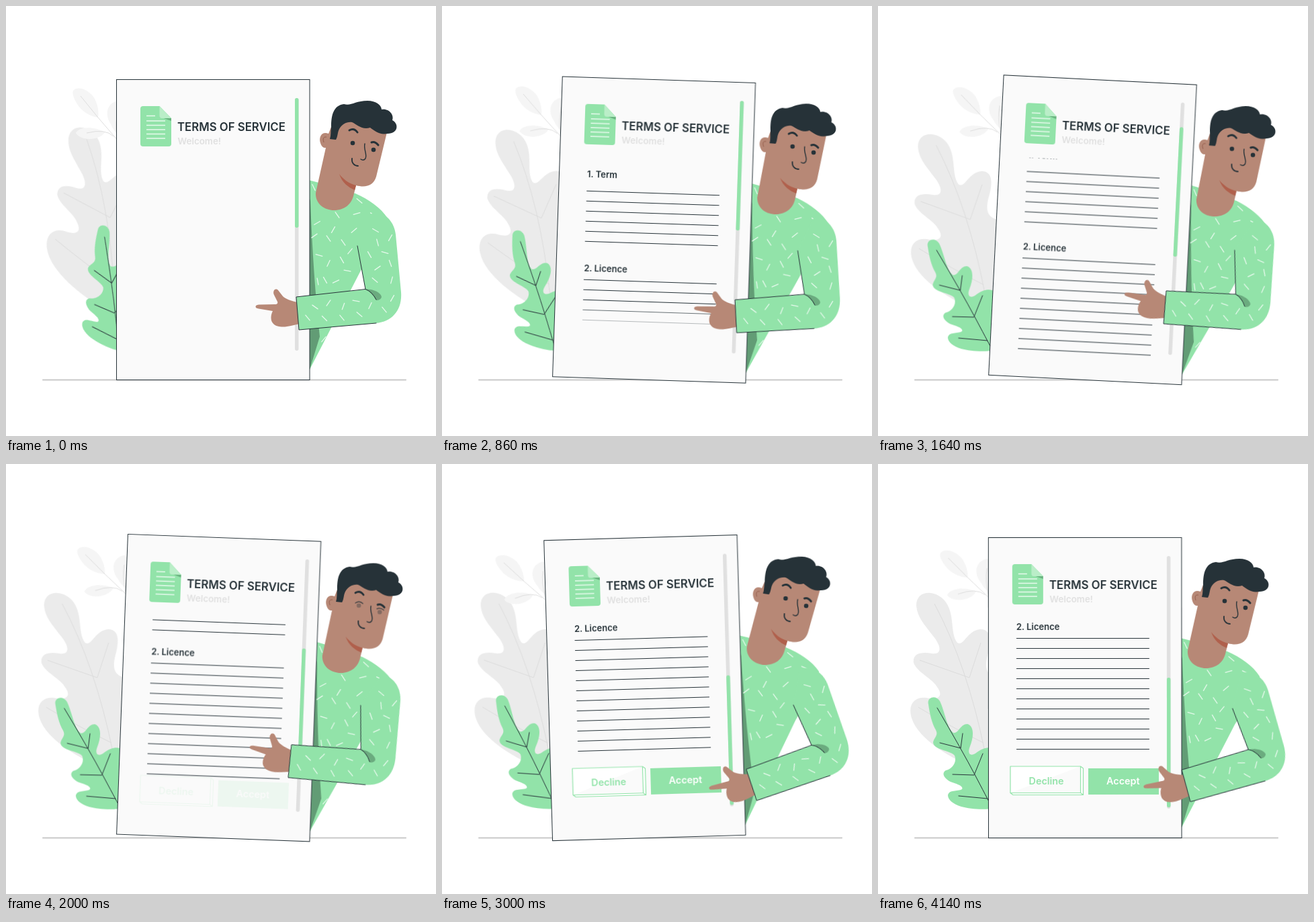
These frames come from a looping animation (640 px wide and 640 px high, 4210 ms). An HTML page:

```html
<!DOCTYPE html>
<html lang="en">
<head>
<meta charset="utf-8">
<title>Terms of service</title>
<style>
html, body { margin: 0; width: 100%; height: 100%; overflow: hidden; background: #fff; }
svg { display: block; width: 100%; height: 100%; }
text { font-family: Inter, "Open Sans", sans-serif; font-weight: 600; }
.line { fill: none; stroke: #263238; stroke-linecap: round; stroke-linejoin: round; }
.green { fill: #92e3a9; }
.dark { fill: #263238; }
.skin { fill: #b78876; }
.dash { fill: none; stroke: #e6f9ec; stroke-width: 1.3; stroke-linecap: round; }

.sway, .head, .arm, .bush, .twig, .leaf, .scroll, .buttons {
  animation: 4210ms ease-in-out infinite;
}
.sway { transform-origin: 308.5px 556.5px; animation-name: sway; }
.head { transform-origin: 488px 290px; animation-name: head; }
.arm  { transform-origin: 563px 335px; animation-name: arm; }
.bush { transform-origin: 166px 443px; animation-name: bush; }
.twig { transform-origin: 165px 200px; animation-name: twig; }
.leaf { transform-origin: 168px 508px; animation-name: leaf; }
.first  { --by: -151px; animation-name: scrollLate; }
.second { --by: -151px; animation-name: scroll; }
.thumb  { --by: 181px; animation-name: scroll; }
.buttons { animation-name: buttons; }
.eyes { animation: eyes 4210ms linear infinite; }
.lids { animation: lids 4210ms linear infinite; }

@keyframes sway {
  0%, 100% { transform: rotate(0deg); }
  35.2% { transform: rotate(2.95deg); }
  79.6% { transform: rotate(-2deg); }
}
@keyframes head {
  0%, 100% { transform: rotate(0deg); }
  30.9% { transform: rotate(-5deg); }
  78.4% { transform: rotate(4.2deg); }
}
@keyframes arm {
  0% { transform: rotate(0deg); }
  16.6% { transform: rotate(-.3deg); }
  50%, 56.3% { transform: rotate(8.2deg); }
  72.4%, 84.8% { transform: rotate(-12.4deg); }
  100% { transform: rotate(-10.5deg); }
}
@keyframes bush {
  0% { transform: rotate(8.6deg); }
  48.7%, 61% { transform: rotate(-.1deg); }
  82% { transform: rotate(.4deg); }
  100% { transform: rotate(0deg); }
}
@keyframes twig {
  0% { transform: rotate(0deg); }
  44%, 61% { transform: rotate(-8deg); }
  84% { transform: rotate(-4.8deg); }
  100% { transform: rotate(-5.8deg); }
}
@keyframes leaf {
  0% { transform: rotate(21.5deg); }
  41.6%, 48% { transform: rotate(-.5deg); }
  80% { transform: rotate(2.6deg); }
  100% { transform: rotate(0deg); }
}
@keyframes scroll {
  0%, 30.9% { transform: none; }
  56.8%, 100% { transform: translateY(var(--by)); }
}
@keyframes scrollLate {
  0%, 30.9% { transform: none; }
  58.2%, 100% { transform: translateY(var(--by)); }
}
@keyframes buttons {
  0%, 44.4% { opacity: 0; transform: translateY(20px); }
  57%, 100% { opacity: 1; transform: none; }
}
@keyframes eyes {
  0%, 8%, 16%, 43%, 52%, 58%, 64%, 81%, 89%, 100% { opacity: 1; }
  12%, 47.5%, 84.8% { opacity: .35; }
  61% { opacity: .7; }
}
@keyframes lids {
  0%, 8%, 16%, 43%, 52%, 58%, 64%, 81%, 89%, 100% { opacity: 0; }
  12%, 47.5%, 84.8% { opacity: .8; }
  61% { opacity: .2; }
}
</style>
</head>
<body>
<svg viewBox="0 0 640 640">
  <clipPath id="window"><rect x="180" y="230" width="245" height="290"/></clipPath>

  <path d="M55 556.5H595" fill="none" stroke="#c9c9c9" stroke-width="2" stroke-linecap="round"/>

  <g class="bush">
    <path fill="#ebebeb" d="M57 210C57 189 82 186 98 202C116 222 106 250 118 266C128 272 132 248 152 246C172 246 167 270 163 285C158 305 162 315 178 318L192 440L152 455C110 440 60 410 50 378C44 358 54 346 72 348C90 352 98 345 88 332C82 320 58 310 53 296C51 282 64 279 80 282C95 284 95 272 82 256C70 240 58 228 57 210Z"/>
    <path fill="none" stroke="#dcdcdc" d="M84 208Q133 300 159 428M62 292L136 318L153 266M60 362Q110 392 157 415"/>
  </g>

  <g class="sway"><g class="twig">
    <path fill="#f5f5f5" d="M100 126C106 118 124 124 132 138C138 150 138 160 137 166C124 164 112 156 106 146C101 138 98 130 100 126ZM168 141C150 143 146 162 156 176C158 182 162 186 165 190C180 170 182 145 168 141ZM104 189C108 180 130 178 147 188C140 200 112 202 104 189Z"/>
    <path fill="none" stroke="#dedede" d="M111 134L137 166L168 202M120 189Q148 182 160 194M167 155Q162 172 165 196"/>
  </g></g>

  <g class="leaf">
    <path class="green" d="M75 358C72 347 86 343 92 353C100 370 102 392 112 400C120 402 122 387 133 387C144 390 142 408 137 420C132 432 138 436 146 430C156 422 168 420 174 425L176 512C160 515 138 514 124 510C112 506 104 500 104 493C106 484 118 488 125 484C128 479 116 476 108 473C98 468 94 460 101 456C110 454 118 444 114 434C108 426 82 426 82 414C84 406 90 404 86 396C80 386 77 372 75 358Z"/>
    <path class="line" d="M88 363Q124 424 146 466T168 508M92 415L123 423L126 401M111 462L143 463L156 431M120 494L163 498"/>
  </g>

  <g class="sway">
    <g>
      <path class="green" d="M438 256L462 262L520 279C540 288 558 300 568 316L566 345L545 365L531 388L452 541H438Z"/>
      <path fill="#629c75" d="M450 280L453 290Q457 400 467 492L452 541H450Z"/>
      <path class="dash" id="torsoDashes"/>
    </g>
    <g class="head">
      <path class="skin" d="M480 190C470 186 465 195 468 204C470 211 474 211 476 211L461 278C460 295 475 304 488 304C505 304 514 294 517 283L521 267C536 271 547 267 551 254L567 188L500 165L484 180Z"/>
      <path fill="#b0604c" d="M496 250C500 263 510 270 519 274L521 267C510 264 502 258 496 250Z"/>
      <path fill="none" stroke="#96604f" d="M477 195Q470 194 473 203"/>
      <path class="dark" d="M482 198C484 192 483 186 484 180C484 163 487 148 503 146C514 149 520 141 538 141C551 141 559 148 559 154C570 152 578 162 575 170C585 175 584 190 568 190C555 192 549 186 542 181C530 185 522 176 515 173C507 172 500 176 496 183C493 189 494 194 491 199Z"/>
      <path class="line" stroke-width="3" d="M511 185Q518 181 523 188M544 203Q549 201 554 207"/>
      <path class="line" stroke-width="1.4" d="M534 205C532 214 538 221 535 227Q532 231 528 228"/>
      <path class="line" stroke-width="1.8" d="M515 227C514 234 519 238 524 238"/>
      <g class="eyes dark"><circle cx="516" cy="204" r="3.3"/><circle cx="547" cy="214" r="3.3"/></g>
      <path class="line lids" stroke-width="1.5" d="M511 200Q517 196 522 201M543 209Q548 207 553 211"/>
    </g>

    <rect x="164.5" y="109.5" width="287.5" height="447" fill="#fafafa" stroke="#263238"/>
    <path class="green" d="M204 149H228.500L246 167V205Q246 209 242 209H204Q200 209 200 205V153Q200 149 204 149Z"/>
    <path fill="#69b37f" d="M229 165L246 167V171Z"/>
    <path fill="#baeec8" d="M228.500 149L246 167H232Q228.500 167 228.500 163Z"/>
    <path fill="none" stroke="#e8faee" stroke-width="1.4" d="M209 163.500H222M209 171H237M209 177.500H237M209 184H237M209 190.500H237M209 197H237"/>
    <text class="dark" x="255" y="185.500" font-size="16.8">TERMS OF SERVICE</text>
    <text x="255.500" y="206" font-size="13.4" fill="#e0e0e0">Welcome!</text>

    <rect x="430" y="137" width="5.500" height="376" rx="2.750" fill="#e0e0e0"/>
    <rect class="green scroll thumb" x="430" y="137" width="5.500" height="193" rx="2.750"/>

    <g clip-path="url(#window)">
      <g class="scroll first" id="term"></g>
      <g class="scroll second" id="licence"></g>
    </g>

    <g class="buttons" font-size="14.4">
      <path fill="#fff" stroke="#92e3a9" stroke-width="1.2" stroke-linejoin="round" d="M197 450H301.500L305.500 453V492.500H201L197 489.500ZM197 489.500H301.500V450M301.500 489.500L305.500 492.500"/>
      <text class="green" x="224.500" y="476.500">Decline</text>
      <rect class="green" x="313" y="453" width="105" height="39"/>
      <text x="340" y="476.500" fill="#fff">Accept</text>
    </g>

    <g class="arm">
      <path class="skin" d="M434 441C424 439 416 436 412 432L405 423C401 419 396 424 399 430L404 440C405 443 403 444 400 444L376 444.500C370 445 370 450 376 450.500L397 454C394 460 393 468 398 473C404 479 416 478 424 476L437 473Z"/>
      <path class="green" d="M523 356L545 308C562 304 578 320 580 340L588 426C590 452 575 470 551 472L436 482L432 433L535 422Z"/>
      <path fill="#6bab7f" d="M535 421.500C546 421 558 426 559 433Q558 438 551 438Q545 427 535 421.500Z"/>
      <path class="dash" id="armDashes"/>
      <path class="line" d="M523 357L535 421.500L432 433L436 482L551 472M535 421.500Q545 425 551 437"/>
    </g>
  </g>
</svg>
<script>
const $ = id => document.getElementById(id);
const pct = ms => (ms / 42.1).toFixed(2) + '%';
let rules = '';

// Adds an element that fades in at a given time of the loop.
function reveal(group, markup, start, length) {
  const name = 'show-' + group.id + group.childElementCount;
  rules += `@keyframes ${name}{0%,${pct(start)}{opacity:0}${pct(start + length)},to{opacity:1}}`;
  group.insertAdjacentHTML('beforeend',
    `<g style="animation:${name} 4210ms linear infinite">${markup}</g>`);
}

const heading = (label, y) => `<text class="dark" x="206" y="${y}" font-size="13">${label}</text>`;
const row = y => `<path class="line" stroke-width="1.1" d="M206.500 ${y}H403.500"/>`;

reveal($('term'), heading('1. Term', 258), 40, 150);
for (let i = 0; i < 6; i++) reveal($('term'), row(278.5 + 15 * i), 75 + 45 * i, 150);

reveal($('licence'), heading('2. Licence', 398), 320, 150);
for (let i = 0; i < 12; i++) {
  const start = i < 6 ? 420 + 90 * i : 1165 + 25 * (i - 6);
  reveal($('licence'), row(410.5 + 15 * i), start, 250);
}

const style = document.createElement('style');
style.textContent = rules;
document.head.append(style);

// Each mark is x, y and angle in degrees.
function dashes(id, marks) {
  $(id).setAttribute('d', marks.map(([x, y, deg]) => {
    const a = deg * Math.PI / 180, dx = 5 * Math.cos(a), dy = 5 * Math.sin(a);
    return `M${x - dx} ${y - dy}l${2 * dx} ${2 * dy}`;
  }).join(''));
}

dashes('torsoDashes', [
  [458, 270, 65], [493, 311, 55], [522, 309, -15], [463, 323, -30], [487, 333, -60],
  [518, 334, -40], [480, 346, 55], [502, 352, 55], [466, 371, 15], [480, 383, -65],
  [500, 378, 60], [512, 365, -50], [508, 394, 10], [459, 342, -35], [491, 410, -25],
  [475, 408, 60], [526, 290, 40], [547, 310, 25], [464, 410, 80], [473, 496, -50]
]);
dashes('armDashes', [
  [550, 334, 30], [553, 352, 75], [572, 345, -60], [541, 370, 60], [564, 367, 15],
  [553, 390, -35], [572, 383, 70], [549, 408, 40], [574, 408, -75], [575, 435, -60],
  [563, 452, 50], [542, 446, -65], [521, 439, 10], [502, 447, -70], [480, 442, -55],
  [460, 448, 35], [449, 464, 50], [474, 465, 45], [500, 464, 50], [526, 459, 40]
]);
</script>
</body>
</html>
```
